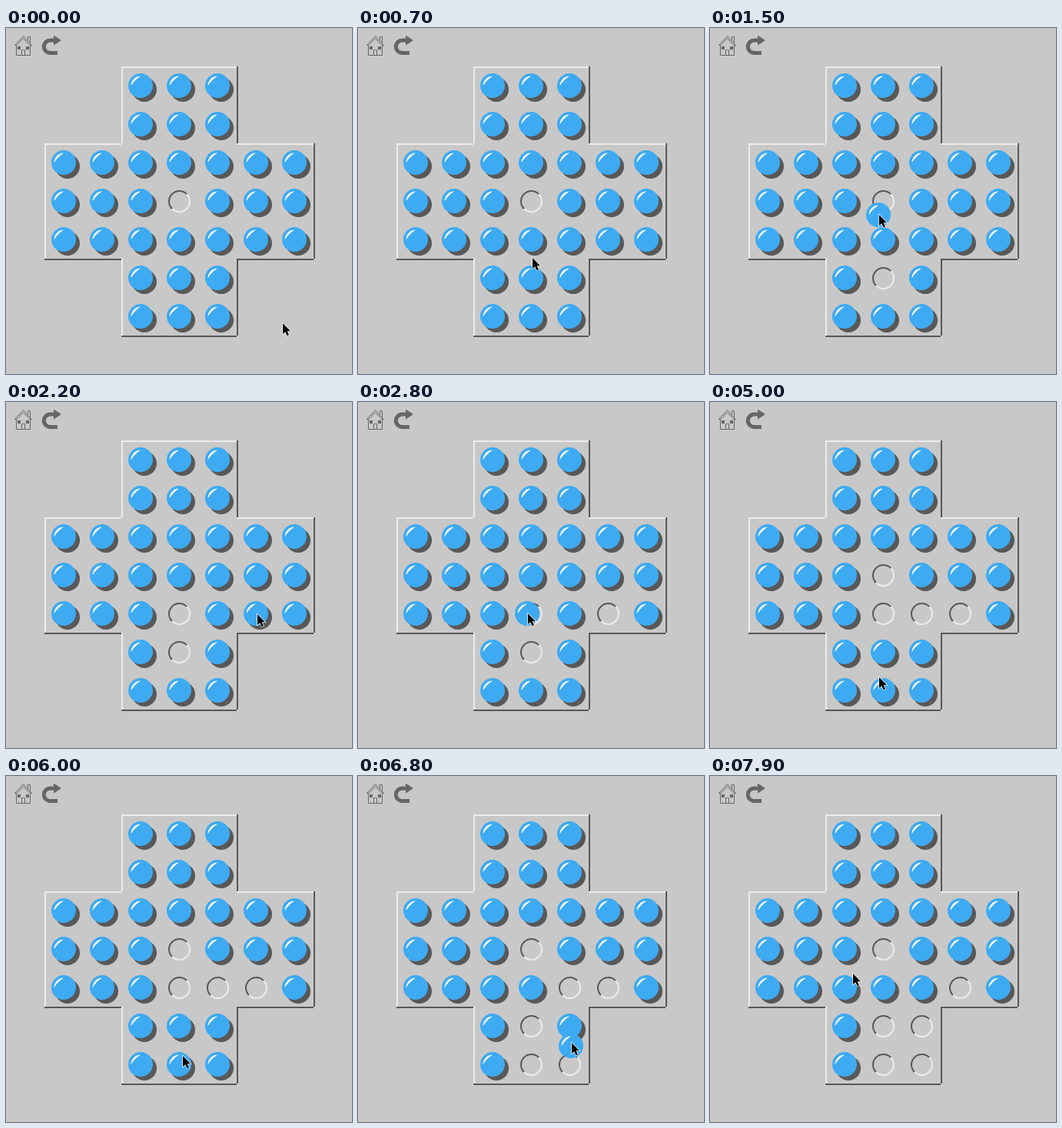
Animation, 450 px wide and 450 px high, one loop 8 s. Source, as an HTML page with a canvas:

```html
<!DOCTYPE html>
<html lang="en">
<head>
<meta charset="utf-8">
<title>Peg solitaire</title>
<style>
html, body { margin: 0; width: 100%; height: 100%; overflow: hidden; background: #c8c8c8; }
canvas { display: block; width: 450px; height: 450px; }
</style>
</head>
<body>
<canvas id="stage" width="450" height="450"></canvas>
<script>
const ctx = document.getElementById('stage').getContext('2d');
const LOOP = 8000, STEP = 100, LAG = 8, CELL = 50;
const BG = '#c8c8c8', BLUE = '#3daaf2', DARK = '#585858', LIGHT = '#ececec', ICON = '#666';

// Pointer glides: begin, end, then the point reached
const HOME = [359, 384];
const glides = [
  [0, 700, 226, 299], [800, 1000, 226, 321],
  [1300, 1500, 219, 243], [1500, 1700, 224, 234],
  [1900, 2200, 326, 276], [2300, 2600, 208, 276], [2600, 2700, 220, 275],
  [3000, 3400, 246, 262], [3400, 3700, 228, 231],
  [4200, 4700, 229, 367], [4900, 5400, 131, 280],
  [5500, 6000, 229, 364], [6000, 6300, 231, 277],
  [6300, 6600, 277, 372], [6700, 7000, 277, 277],
  [7000, 7300, 231, 334], [7300, 7900, 185, 257]
];

// Jumps by column and row
const moves = [
  { grab: 1200, drop: 1900, from: [3, 5], to: [3, 3] },
  { grab: 2300, drop: 2900, from: [5, 4], to: [3, 4] },
  { grab: 4200, drop: 4500, from: [3, 3], to: [3, 5] },
  { grab: 6100, drop: 6300, from: [3, 6], to: [3, 4] },
  { grab: 6700, drop: 7100, from: [4, 6], to: [4, 4] }
];

const mid = v => v > 1 && v < 5;
const within = v => v >= 0 && v < 7;
const onBoard = (c, r) => within(c) && within(r) && (mid(c) || mid(r));
const key = ([c, r]) => c + ',' + r;
const cells = [];
for (let r = 0; r < 7; r++)
  for (let c = 0; c < 7; c++)
    if (onBoard(c, r)) cells.push([c, r]);

const smooth = u => u * u * (3 - 2 * u);

function pointer(t) {
  let [x, y] = HOME;
  for (const [begin, end, tx, ty] of glides) {
    if (t <= begin) break;
    const k = smooth(Math.min(1, (t - begin) / (end - begin)));
    x += (tx - x) * k;
    y += (ty - y) * k;
  }
  return [Math.round(x), Math.round(y)];
}

function boardAt(t) {
  const pegs = new Set(cells.map(key));
  pegs.delete('3,3');
  let held = false;
  for (const { grab, drop, from, to } of moves) {
    if (t < grab) break;
    pegs.delete(key(from));
    held = t < drop;
    if (held) break;
    pegs.delete(key([(from[0] + to[0]) / 2, (from[1] + to[1]) / 2]));
    pegs.add(key(to));
  }
  return { pegs, held };
}

function disc(x, y, r, color) {
  ctx.fillStyle = color;
  ctx.beginPath();
  ctx.arc(x, y, r, 0, 2 * Math.PI);
  ctx.fill();
}

function drawPeg(x, y, shadow) {
  if (shadow) disc(x + 5, y + 5, 16, DARK);
  disc(x, y, 16, BLUE);
  ctx.fillStyle = '#fff';
  ctx.beginPath();
  ctx.arc(x, y, 12.4, Math.PI, Math.PI * 1.5);
  ctx.quadraticCurveTo(x - 7.5, y - 7.5, x - 12.4, y);
  ctx.fill();
}

function drawHole(x, y) {
  const half = (color, start) => {
    ctx.strokeStyle = color;
    ctx.beginPath();
    ctx.arc(x + 0.5, y + 0.5, 13.5, start, start + Math.PI);
    ctx.stroke();
  };
  ctx.lineWidth = 2;
  half(LIGHT, -Math.PI / 4);
  half(DARK, Math.PI * 0.75);
}

// Bevel: every cell side without a neighbour gets a bar
function drawBoard() {
  const bar = (color, x, y, w, h) => {
    ctx.fillStyle = color;
    ctx.fillRect(x, y, w, h);
  };
  for (const [c, r] of cells) {
    const x = CELL * (c + 1), y = CELL * (r + 1);
    if (!onBoard(c, r - 1)) bar(LIGHT, x, y, CELL, 2);
    if (!onBoard(c - 1, r)) bar(LIGHT, x, y, 2, CELL);
    if (!onBoard(c + 1, r)) bar(DARK, x + CELL, y, 2, CELL);
    if (!onBoard(c, r + 1)) bar(DARK, x, y + CELL, CELL, 2);
  }
}

const house = new Path2D('M11.5 22.5L22.5 10.5L33.5 22.5H31L22.5 13.5L14 22.5Z ' +
  'M28.5 16.5V11.5H31.5V20 M13.5 22.5V35.5H31.5V22.5 M20.5 35.5V28.5H24.5V35.5');
const redo = new Path2D('M63 16H57.5A8.2 8.2 0 0 0 57.5 32.4H67');
const redoHead = new Path2D('M62 9.5L72 16L62 22.5Z');
const arrow = new Path2D('M0 0V14L3.2 11.2L5.6 16.2L8 15.2L5.7 10.3H10Z');

function drawIcons() {
  ctx.strokeStyle = ctx.fillStyle = ICON;
  ctx.lineWidth = 1;
  ctx.stroke(house);
  ctx.fillRect(15, 24, 4, 4);
  ctx.fillRect(26, 24, 4, 4);
  ctx.lineWidth = 5;
  ctx.stroke(redo);
  ctx.fill(redoHead);
}

function drawPointer(x, y) {
  ctx.save();
  ctx.translate(x + 1, y);
  ctx.strokeStyle = '#fff';
  ctx.lineWidth = 1.4;
  ctx.stroke(arrow);
  ctx.fillStyle = '#000';
  ctx.fill(arrow);
  ctx.restore();
}

function draw(t) {
  const { pegs, held } = boardAt(t);
  ctx.fillStyle = BG;
  ctx.fillRect(0, 0, 450, 450);
  drawIcons();
  drawBoard();
  for (const cell of cells) {
    const [x, y] = cell.map(v => CELL * (v + 1.5));
    if (pegs.has(key(cell))) drawPeg(x, y, true);
    else drawHole(x, y);
  }
  // A dragged peg trails the pointer slightly
  if (held) drawPeg(...pointer(t - LAG), false);
  drawPointer(...pointer(t));
}

const start = performance.now();
function tick() {
  const t = (performance.now() - start) % LOOP;
  draw(Math.floor(t / STEP) * STEP);
  requestAnimationFrame(tick);
}
tick();
</script>
</body>
</html>
```
